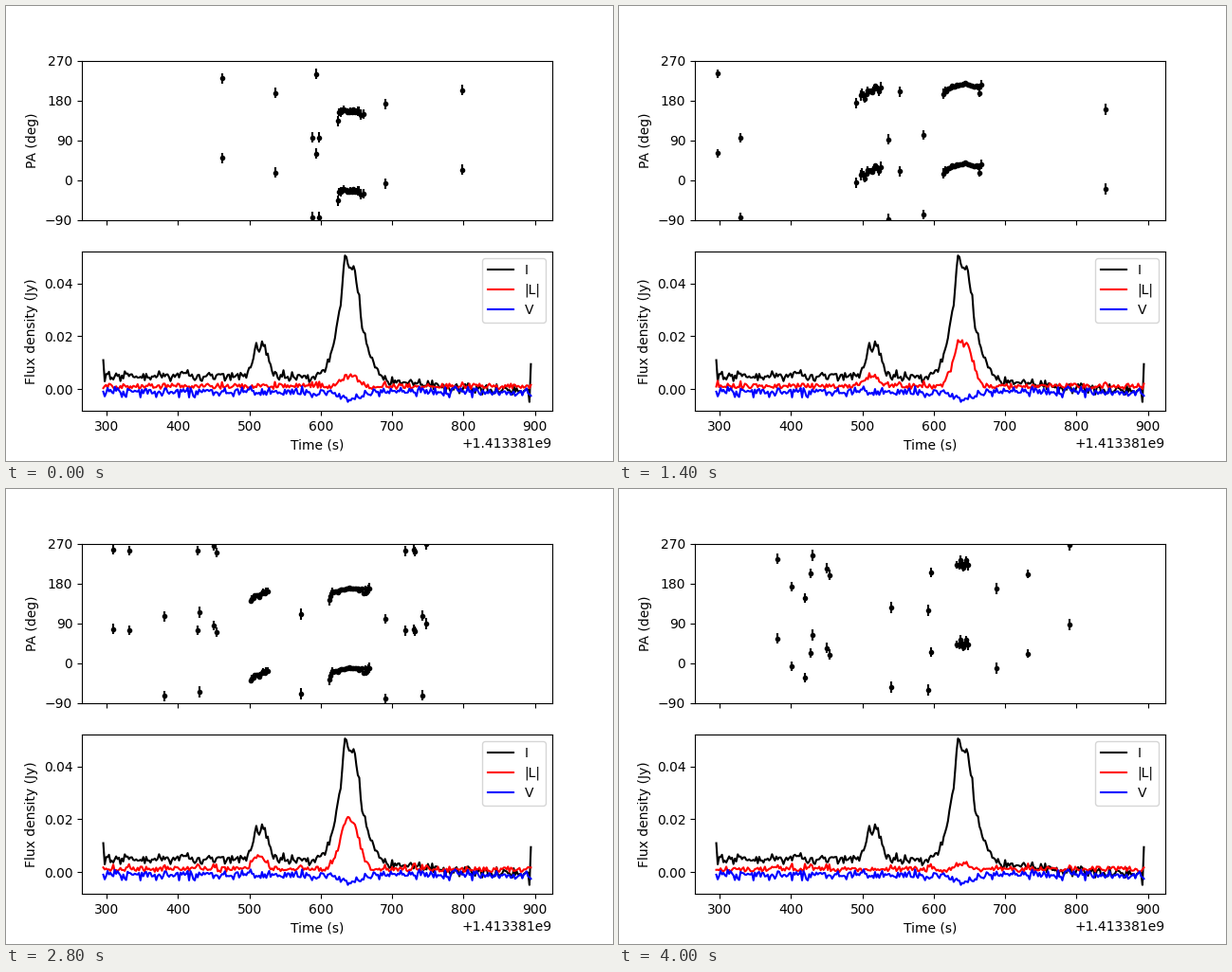
Animation of 640x480 px, one loop 4100 ms. Source, as a matplotlib script:

```python
import numpy as np
import matplotlib.pyplot as plt
from matplotlib.animation import FuncAnimation
from matplotlib.collections import LineCollection

FRAMES, INTERVAL = 41, 100
EPOCH = 1.413381e9
CUTOFF = 0.0023      # weakest |L| (Jy) with a measured angle
TURN = 9.6           # degrees the pulses turn per frame
DRIFT = 10.8         # degrees the isolated detections turn per frame
STEP = 8             # frames between independent noise draws

rng = np.random.default_rng(12)
t = np.linspace(295.2, 894.4, 300)


def bump(centre, width, height):
    return height * np.exp(-0.5 * ((t - centre) / width) ** 2)


def noise(sigma, limit=2.3):
    return sigma * rng.normal(size=t.size).clip(-limit, limit)


# Total intensity: sloping floor, weak double pulse, strong double pulse
floor = -0.001 + 0.006 / (1 + np.exp((t - 735) / 50))
side_i = bump(514, 10, 0.0085) + bump(509, 2, 0.004) + bump(521.5, 4, 0.005)
main_i = (bump(639, 15, 0.036) + bump(634, 3, 0.011)
          + bump(648, 5, 0.0095) + bump(665, 12, 0.0045))
stokes_i = floor + side_i + main_i + noise(0.001)
stokes_i[[0, 1, -2, -1]] = 0.011, 0.003, -0.0048, 0.0095

stokes_v = -0.001 - bump(643, 13, 0.003) + noise(0.0009)

# Linear polarisation: relative strength and angle along the pulses
profile = (bump(512, 11, 0.28) + bump(640, 13.5, 0.9)
           + bump(635, 4, 0.14) + bump(649, 4, 0.12))
side = (t > 491) & (t < 529)
pulses = side | ((t > 608) & (t < 671))
swing = np.where(side, -6 - 45 * np.exp((490 - t) / 14),
                 -14 * ((t - 643) / 27) ** 2)

shape = (FRAMES // STEP + 2, t.size)
anchors = rng.normal(size=shape) + 1j * rng.normal(size=shape)
anchors *= np.where(profile > 0.05, 0.0006, 0.00095)


def background(k):
    """Complex noise that changes slowly from frame to frame."""
    i, part = divmod(k, STEP)
    part /= STEP
    mix = (1 - part) * anchors[i] + part * anchors[i + 1]
    return mix / np.hypot(part, 1 - part)


# Isolated detections: the lasting ones as (time, angle at the given frame)
LASTING = ((309, 23), (332, 20), (571, 57), (690, 46), (719, 20), (730, 23),
           (743, 53), (749, 35))
PASSING = ((317, 18), (341, 134), (352, 127), (397, 18), (460, 76), (548, 1),
           (707, 50), (765, 61))
LATE = ((381, 149), (428, 117), (429.5, 158), (449, 128), (453, 113),
        (733, 115))

tracks = []


def add_track(time, angle, ref, start, stop):
    index = int(np.abs(t - time).argmin())
    tracks.append((index, angle, ref, start, stop, rng.uniform(10, 13)))


for spots, ref, start, stop in ((LASTING, 23, 18, 28), (PASSING, 23, 18, 23),
                                (LATE, 32, 28, 40)):
    for time, angle in spots:
        add_track(time, angle, ref, start - rng.integers(0, 4),
                  stop + rng.integers(0, 4))

# Brief ones fill the stretch around the start of the loop
for _ in range(42):
    mid = (30 + rng.integers(0, 27)) % FRAMES
    life = rng.integers(1, 4)
    time = rng.choice([rng.uniform(296, 485), rng.uniform(535, 600),
                       rng.uniform(680, 894)])
    add_track(time, rng.uniform(0, 180), mid, mid - life, mid + life)


def state(k):
    """|L| for every sample, and the detected times, angles and errors."""
    # Depolarised away from the best frame, with a small quadrature leak
    gain = 0.0258 * np.sinc((k - 21.5) / 17.5) + 0.0025j * (1 - k / 20)
    field = profile * gain + background(k)
    lin = np.abs(field)
    quiet = np.maximum(0.0021, profile * abs(gain))
    lin = np.where(pulses, lin, np.minimum(lin, quiet))

    hit = pulses & (lin > CUTOFF)
    turned = 254 + TURN * (k - 18) + swing + np.degrees(np.angle(field)) / 2
    times, angles = list(t[hit]), list(turned[hit])
    errors = list(0.03 / lin[hit])

    for i, angle, ref, start, stop, err in tracks:
        if start <= k <= stop:
            times.append(t[i])
            angles.append(angle + DRIFT * (k - ref))
            errors.append(err)
            lin[i] = 0.033 / err
    wrapped = (np.array(angles) + 90) % 180 - 90
    return lin, np.array(times), wrapped, np.array(errors)


fig, (ax_pa, ax_flux) = plt.subplots(2, 1, sharex=True, figsize=(6.4, 4.8),
                                     dpi=100)
dots, = ax_pa.plot([], [], "k.")
bars = LineCollection([], colors="k", linewidths=1.5)
ax_pa.add_collection(bars, autolim=False)
ax_pa.set_ylim(-90, 270)
ax_pa.set_yticks(range(-90, 271, 90))
ax_pa.set_ylabel("PA (deg)")

ax_flux.plot(EPOCH + t, stokes_i, "k", label="I")
line_l, = ax_flux.plot(EPOCH + t, 0 * t, "r", label="|L|")
ax_flux.plot(EPOCH + t, stokes_v, "b", label="V")
ax_flux.set_xlim(EPOCH + 265.2, EPOCH + 924.4)
ax_flux.set_ylim(-0.0082, 0.05197)
ax_flux.set_yticks([0, 0.02, 0.04])
ax_flux.set_xlabel("Time (s)")
ax_flux.set_ylabel("Flux density (Jy)")
ax_flux.legend(loc="upper right")


def update(k):
    lin, times, pa, err = state(k)
    x = EPOCH + np.tile(times, 2)
    y = np.concatenate([pa, pa + 180])
    e = np.tile(err, 2)
    dots.set_data(x, y)
    bars.set_segments([[(a, b - c), (a, b + c)] for a, b, c in zip(x, y, e)])
    line_l.set_ydata(lin)
    return dots, bars, line_l


anim = FuncAnimation(fig, update, frames=FRAMES, interval=INTERVAL,
                     repeat=True, repeat_delay=0, blit=False)
plt.show()
```
